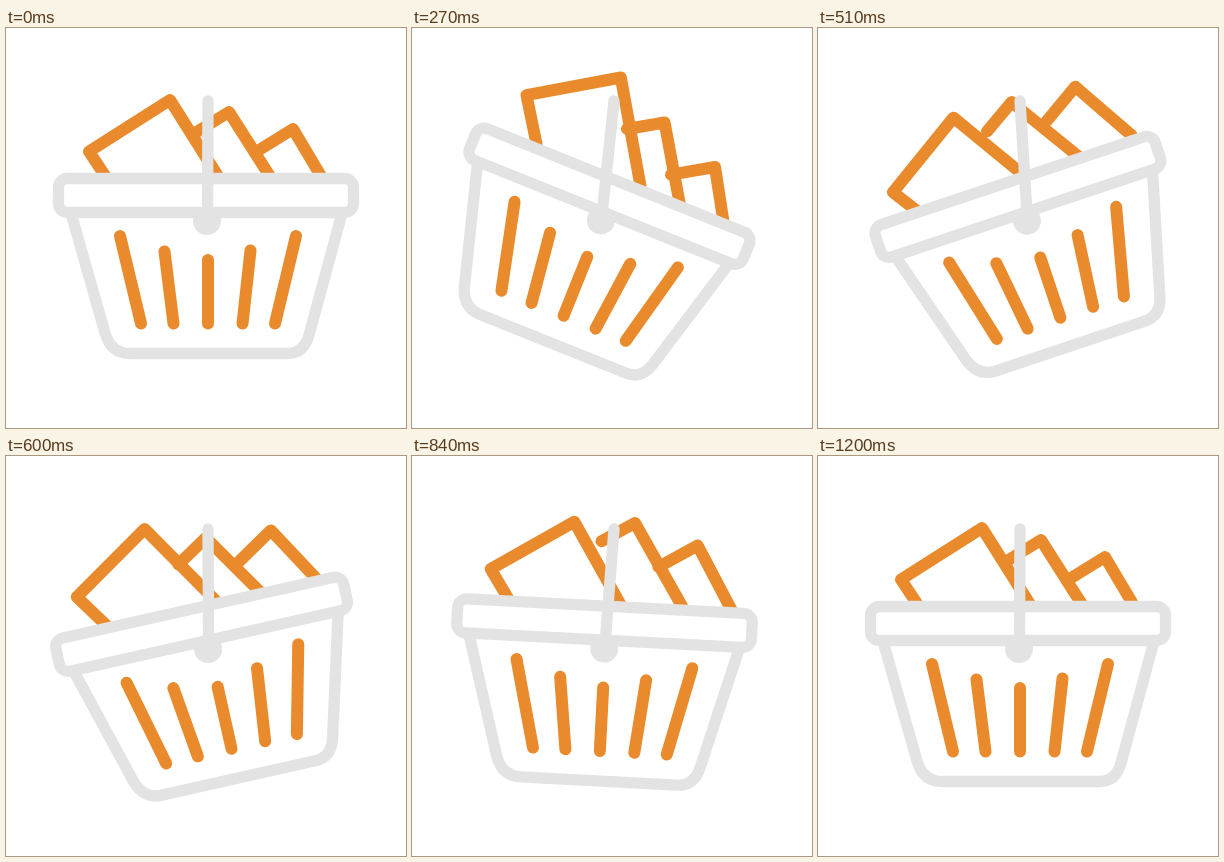
Write an HTML page that moves like this. It is 400x400 px and loops after 1260 ms.

```html
<!DOCTYPE html>
<html lang="en">
<head>
<meta charset="utf-8">
<title>Swinging basket</title>
<style>
  html, body { margin: 0; height: 100%; overflow: hidden; background: #fff; }
  svg { display: block; width: 100%; height: 100%; }
  path, rect { fill: none; stroke-linecap: round; stroke-linejoin: round; }
  .orange { stroke: #e98b2d; stroke-width: 12; }
  .grey { stroke: #e3e3e3; stroke-width: 11.3; }
  .grey .rim { fill: #fff; }
  .hub { fill: #e3e3e3; }
</style>
</head>
<body>
<svg viewBox="0 0 400 400">
  <g id="swing">
    <g id="basket">
      <g class="orange">
        <path class="item" d="M110.5 165 L83 123.5 L164 72 L222.5 165"/>
        <path class="item" d="M190.5 104 L223 84 L274.5 165"/>
        <path class="item" d="M249 124.5 L287 101 L325 165"/>
        <path d="M114 208 L135 295.5 M158.5 223.5 L167.5 295.5 M202 232 V295.5 M244.5 222.5 L236.5 295.5 M290 208 L269 295.5"/>
      </g>
      <g class="grey">
        <path d="M65.5 187 L99 305 Q105 325.5 124 325.5 H281 Q298 325.5 303 307 L335.5 187"/>
        <rect class="rim" x="52.5" y="150.5" width="295" height="34" rx="9"/>
      </g>
    </g>
    <path class="grey" d="M202 73 L201.5 193"/>
    <circle class="hub" cx="201" cy="193" r="14"/>
  </g>
</svg>
<script>
const LOOP = 1260, STEP = 30, END = 1200;
const BOUNCE = 400, STAGGER = 100, HEIGHT = 20;

// [time in ms, angle in degrees]
const handleKeys = [[0, 0], [250, 6], [470, -4.2], [775, 5.3], [1000, -0.4], [END, 0]];
const basketKeys = [[0, 0], [250, 22.7], [475, -18.7], [550, -18.2], [730, 13], [930, -4.3], [END, 0]];

const swing = document.getElementById('swing');
const basket = document.getElementById('basket');
const items = document.querySelectorAll('.item');

function angleAt(keys, t) {
  const i = Math.max(1, keys.findIndex(key => key[0] >= t));
  const [t0, a0] = keys[i - 1], [t1, a1] = keys[i];
  const eased = (1 - Math.cos(Math.PI * (t - t0) / (t1 - t0))) / 2;
  return a0 + (a1 - a0) * eased;
}

// Each item hops twice, one after the other.
function hopAt(t, index) {
  const phase = (t - STAGGER * (index + 1)) / BOUNCE;
  return phase > 0 && phase < 2 ? HEIGHT * Math.sin(Math.PI * phase) ** 2 : 0;
}

function draw(t) {
  const handle = angleAt(handleKeys, t);
  const tilt = angleAt(basketKeys, t) - handle;
  swing.setAttribute('transform', `rotate(${handle} 202 73)`);
  basket.setAttribute('transform', `rotate(${tilt} 201 193)`);
  items.forEach((item, i) => {
    const hop = hopAt(t, i);
    item.setAttribute('transform', `translate(${hop * 0.12} ${-hop})`);
  });
}

const start = performance.now();
function tick() {
  const t = (performance.now() - start) % LOOP;
  draw(Math.min(END, Math.floor(t / STEP) * STEP));
  requestAnimationFrame(tick);
}
tick();
</script>
</body>
</html>
```
